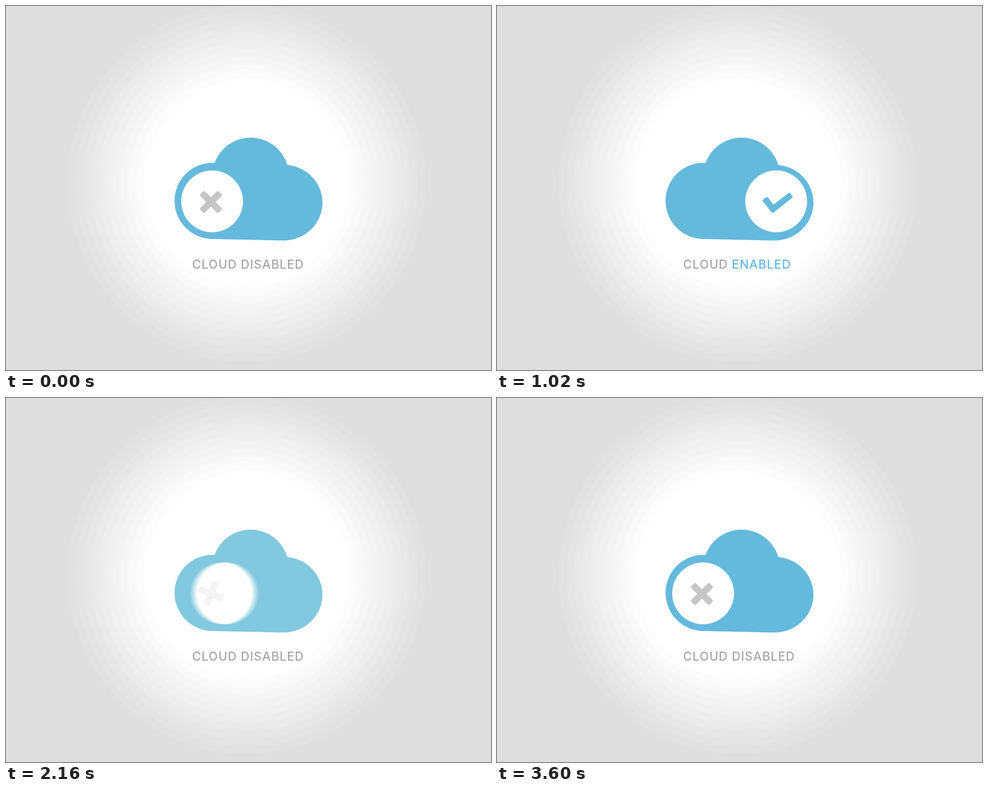
Write an HTML page with a canvas that moves like this. It is 800x600 px and loops after 3.78 s.

```html
<!DOCTYPE html>
<html lang="en">
<head>
<meta charset="utf-8">
<title>Cloud toggle</title>
<style>
  html, body { margin: 0; width: 100%; height: 100%; overflow: hidden; background: #dedede; }
  canvas { display: block; }
</style>
</head>
<body>
<canvas id="stage" width="800" height="600"></canvas>
<script>
const LOOP = 3780, STEP = 30, TURN_ON = 180, TURN_OFF = 1800;
const BLUE = [101, 185, 221], LIGHT = [130, 200, 223];
const LEFT = 340, RIGHT = 460.5, KNOB_Y = 322, KNOB_R = 51;
const BLUR_SAMPLES = 15;

const ctx = document.getElementById('stage').getContext('2d');
const makeLayer = () => Object.assign(document.createElement('canvas'), { width: 800, height: 600 });
const backdrop = makeLayer();
const knobLayer = makeLayer();
const knob = knobLayer.getContext('2d');

const clamp = v => Math.min(1, Math.max(0, v));
const ramp = (t, from, to) => clamp((t - from) / (to - from));
const easeSine = p => (1 - Math.cos(Math.PI * p)) / 2;
const slide = t => easeSine(ramp(t, 80, 380));
const rgb = c => `rgb(${c.map(Math.round)})`;
const mix = (a, b, p) => a.map((v, i) => v + (b[i] - v) * p);

// Damped swing of the icons, in degrees.
function swing(t) {
  if (t < 246 || t >= 1800) return 0;
  const s = t - 350;
  return 24 * Math.exp(-0.0017 * s) * Math.cos(2 * Math.PI * s / 417);
}

function disc(c, x, y, r) {
  c.beginPath();
  c.arc(x, y, r, 0, 2 * Math.PI);
  c.fill();
}

function paintBackdrop() {
  const c = backdrop.getContext('2d');
  c.fillStyle = '#dedede';
  c.fillRect(0, 0, 800, 600);
  for (let r = 307.5; r >= 170; r -= 12.5) {
    const g = Math.round(255 - 33 * (r - 170) / 137.5);
    c.fillStyle = rgb([g, g, g]);
    disc(c, 397, 292, r);
  }
}

const cloud = new Path2D();
function addLobe(x, y, rx, ry) {
  cloud.moveTo(x + rx, y);
  cloud.ellipse(x, y, rx, ry, 0, 0, 2 * Math.PI);
}
addLobe(340.5, 321.2, 62.5, 62.8);
addLobe(403.5, 280.2, 63.2, 63.2);
addLobe(458, 324.2, 64, 62.4);
cloud.addPath(new Path2D('M344 300 H460 L452 386.5 L338 384 Z'));

const checkShape = new Path2D(
  'M440 322.6 L445 318.3 L456 330.8 L481 308.3 L485 312.7 L456 339.7 Z');

function rotated(c, x, y, degrees, draw) {
  c.save();
  c.translate(x, y);
  c.rotate(degrees * Math.PI / 180);
  draw();
  c.restore();
}

function drawCross(angle, opacity) {
  knob.globalAlpha = opacity;
  knob.fillStyle = '#c6c6c6';
  rotated(knob, 338, 323, angle + 45, () => {
    knob.beginPath();
    knob.roundRect(-21.5, -5.5, 43, 11, 3);
    knob.roundRect(-5.5, -21.5, 11, 43, 3);
    knob.fill();
  });
  knob.globalAlpha = 1;
}

function drawCheck(angle, color) {
  knob.fillStyle = knob.strokeStyle = color;
  knob.lineWidth = 4;
  knob.lineJoin = 'round';
  rotated(knob, 462.5, 323, angle, () => {
    knob.translate(-462.5, -323);
    knob.fill(checkShape);
    knob.stroke(checkShape);
  });
}

function drawKnob(t, from, to) {
  knob.clearRect(0, 0, 800, 600);
  knob.fillStyle = '#fff';
  const xAt = time => from + (to - from) * slide(time);
  const start = xAt(t - STEP / 2), end = xAt(t + STEP / 2);
  if (start === end) {
    disc(knob, start, KNOB_Y, KNOB_R);
  } else {
    knob.globalCompositeOperation = 'lighter';
    knob.globalAlpha = 1 / BLUR_SAMPLES;
    for (let i = 0; i < BLUR_SAMPLES; i++) {
      disc(knob, xAt(t + STEP * 0.9 * (i / (BLUR_SAMPLES - 1) - 0.5)), KNOB_Y, KNOB_R);
    }
    knob.globalAlpha = 1;
  }
  // Icons show only where the knob is.
  knob.globalCompositeOperation = 'source-atop';
}

function drawCloud(t, color, lightX) {
  ctx.save();
  ctx.fillStyle = color;
  ctx.fill(cloud);
  const radius = 1.6 * (t - 170);
  if (radius > 0 && t < 300) {
    ctx.clip(cloud);
    ctx.fillStyle = rgb(LIGHT);
    disc(ctx, lightX, 317, radius);
  }
  ctx.restore();
}

function drawLabel(enabled) {
  ctx.font = '500 20px Inter, Lato, sans-serif';
  ctx.letterSpacing = '0.8px';
  ctx.fillStyle = '#a6a6a6';
  ctx.fillText('CLOUD', 307, 433);
  if (enabled) ctx.fillStyle = rgb(BLUE);
  ctx.fillText(enabled ? 'ENABLED' : 'DISABLED', 387.3, 433);
}

function render(time) {
  const turningOff = time >= TURN_OFF;
  const elapsed = time - (turningOff ? TURN_OFF : TURN_ON);
  const t = turningOff ? elapsed - 60 : elapsed;
  const flash = t < 300 ? 0 : 1 - ramp(t, 310, 430);
  const color = rgb(mix(BLUE, LIGHT, flash));
  const iconColor = t > 170 && t < 300 ? rgb(LIGHT) : color;
  const angle = swing(elapsed);

  ctx.drawImage(backdrop, 0, 0);
  drawCloud(t, color, turningOff ? 326 : 474);

  drawKnob(t, turningOff ? RIGHT : LEFT, turningOff ? LEFT : RIGHT);
  drawCheck(turningOff ? 0 : angle, iconColor);
  if (turningOff) drawCross(-angle, ramp(elapsed, 325, 500));
  else drawCross(0, 1 - ramp(elapsed, 0, 150));
  knob.globalCompositeOperation = 'source-over';
  ctx.drawImage(knobLayer, 0, 0);

  drawLabel(turningOff !== (t >= 270));
}

paintBackdrop();
const began = performance.now();
function tick() {
  const time = (performance.now() - began) % LOOP;
  render(Math.floor(time / STEP) * STEP);
  requestAnimationFrame(tick);
}
tick();
</script>
</body>
</html>
```
